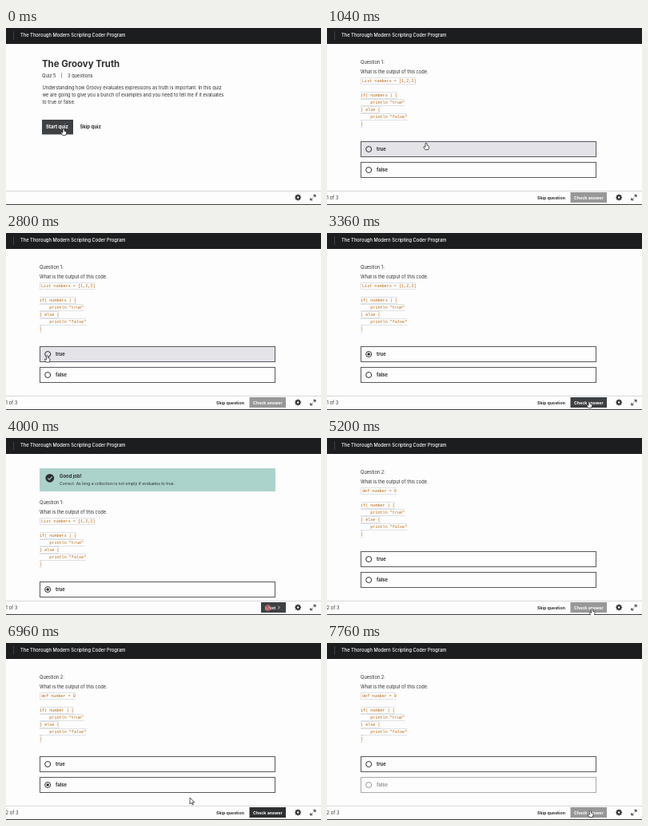
Write an HTML page that moves like this. It is 394 by 222 pixels and loops after 8000 ms.

```html
<!DOCTYPE html>
<html lang="en">
<head>
<meta charset="utf-8">
<title>Quiz</title>
<style>
  html, body { margin: 0; width: 100%; height: 100%; overflow: hidden; background: #fdfdfd; }
  svg { display: block; width: 394px; height: 222px; }
  text { font: 5.74px Inter, sans-serif; fill: #2d2f31; white-space: pre; }
  .b { font-weight: 700; font-size: 5.9px; }
  .s { font-weight: 700; font-size: 5.25px; }
  .w { fill: #fff; }
  .code { font: 5.12px "Liberation Mono", monospace; fill: #b4690e; }
  .chip { fill: none; stroke: #dfe1e4; }
  .line { fill: none; stroke: #2d2f31; }
</style>
</head>
<body>
<svg id="stage" viewBox="0 0 394 222"></svg>
<script>
const LOOP = 8000, STEP = 80;
const INK = '#2d2f31', EDGE = '#58595b', HOVER = '#e3e3e8';
const OPTIONS = [['true', 142], ['false', 168]];

// Pointer path: time, x, y, shape
const path = [
  [0, 72, 126, 'hand'], [80, 98, 125, 'hand'], [160, 122, 125.5, 'arrow'],
  [720, 122, 125.5, 'arrow'], [1040, 124, 144, 'hand'], [1360, 127, 151, 'hand'],
  [1520, 127, 151, 'hand'], [1600, 127.5, 152, 'hand'], [1680, 127.5, 152, 'hand'],
  [1760, 80, 174, 'hand'], [1840, 33, 140, ''], [2560, 33, 140, 'arrow'],
  [2720, 47, 151, 'hand'], [2800, 51.5, 153.5, 'hand'], [3120, 51.5, 153.5, 'hand'],
  [3200, 130, 171, 'hand'], [3280, 260, 198, 'arrow'], [3360, 328, 211, 'hand'],
  [3760, 328, 211, 'hand'], [3840, 327.5, 209.5, 'stop'], [4800, 327.5, 209.5, 'stop'],
  [4880, 329, 211, 'hand'], [5040, 331.5, 214, 'hand'], [6000, 331.5, 214, 'hand'],
  [6080, 310, 207, 'arrow'], [6160, 220, 190, 'arrow'], [6240, 100, 179, 'hand'],
  [6320, 63, 177, 'hand'], [6400, 62, 176.5, 'hand'], [6800, 62, 176.5, 'hand'],
  [6880, 110, 179, 'hand'], [6960, 230, 194, 'arrow'], [7040, 312, 203, 'arrow'],
  [7120, 312, 203, 'arrow'], [7200, 324, 211, 'hand'], [7280, 329.5, 210, 'hand'],
  [LOOP, 329.5, 210, 'hand']
];

// Page state: time, changed values
const states = [
  [0, { page: 0, pick: '', checked: false, good: false }],
  [400, { page: 1 }],
  [3040, { pick: 'true' }],
  [3760, { checked: true }],
  [3840, { good: true }],
  [5200, { page: 2, pick: '', checked: false, good: false }],
  [6720, { pick: 'false' }],
  [7760, { pick: '', checked: true }]
];

const text = (x, y, str, cls = '', style = '') =>
  `<text x="${x}" y="${y}" class="${cls}" style="${style}">${str}</text>`;
const rect = (x, y, w, h, fill, more = '') =>
  `<rect x="${x}" y="${y}" width="${w}" height="${h}" fill="${fill}" ${more}/>`;
const group = (id, body) => `<g id="${id}">${body}</g>`;

function snippet(lines) {
  return lines.map((str, i) => {
    if (!str) return '';
    const x = i ? 42 : 44, y = 68.4 + i * 8.95;
    const end = x + str.length * 3.07;
    const top = Math.round(y - 6) + .5, low = top + 8;
    const side = i ? '' : `M42.5 ${top}V${low}`;
    return `<path class="chip" d="M42 ${top}H${end}M42 ${low}H${end}${side}"/>` + text(x, y, str, 'code');
  }).join('');
}

function question(n, first, test) {
  return text(42, 44.7, `Question ${n}:`) + text(42, 56.5, 'What is the output of this code.') +
    snippet([first, '', `if( ${test} ) {`, '    println "true"', '} else {', '    println "false"', '}']);
}

const option = ([name, y]) => group('opt-' + name,
  rect(42.5, y + .5, 294, 19, 'none', `id="box-${name}" stroke="${EDGE}"`) +
  `<circle class="line" cx="52.2" cy="${y + 10}" r="3.5"/>` +
  `<circle id="dot-${name}" cx="52.2" cy="${y + 10}" r="1.8" fill="${INK}"/>` +
  text(62, y + 11.9, name, 'b'));

const intro =
  text(45, 49.4, 'The Groovy Truth', 'b', 'font-size:11.4px') +
  text(45, 62.3, 'Quiz 5') + text(68.5, 62.3, '|') + text(77, 62.3, '3 questions') +
  text(45.5, 77.3, 'Understanding how Groovy evaluates expressions as truth is important. In this quiz') +
  text(45.5, 86, 'we are going to give you a bunch of examples and you need to tell me if it evaluates') +
  text(45.5, 94.7, 'to true or false.') +
  rect(45, 115, 39, 18.5, INK, 'id="start"') +
  text(50, 126.3, 'Start quiz', 'b w') + text(92.5, 126.3, 'Skip quiz', 'b');

const feedback =
  rect(42, 38, 295, 29, '#acd2cc') + `<circle cx="54.8" cy="50.3" r="5.4" fill="${INK}"/>` +
  '<path d="M52.2 50.4l1.9 1.9 3.5-3.7" fill="none" stroke="#acd2cc" stroke-width="1.1"/>' +
  text(67, 49.9, 'Good job!', 'b') +
  text(67, 58.6, 'Correct. As long a collection is not empty if evaluates to true.', '', 'font-size:5px');

const footer =
  rect(0, 204, 394, 18, '#fdfdfd') + rect(0, 204, 394, 1, '#d5d8dc') + rect(0, 221, 394, 1, '#3c3e40') +
  group('progress',
    '<text id="count" x="-.4" y="215"></text>' +
    group('check', text(263, 214.7, 'Skip question', 's') + rect(304.5, 206, 45.5, 13, INK, 'id="check-box"') +
      text(309, 214.7, 'Check answer', 's w')) +
    group('next', rect(319, 206, 31, 13, '#3e4143') + text(325, 214.7, 'Next', 's w') +
      '<path d="M340.3 210.8l1.8 1.8-1.8 1.8" fill="none" stroke="#fff" stroke-width=".8"/>')) +
  '<circle class="line" cx="365.2" cy="212.5" r="2.2" stroke-width="1.9"/>' +
  '<circle class="line" cx="365.2" cy="212.5" r="3.3" stroke-width="1.3" pathLength="16" stroke-dasharray="1 1" stroke-dashoffset=".5"/>' +
  '<path class="line" d="M384.4 209.6h2.6v2.6M387 209.6l-2.5 2.5M383.4 215.8h-2.6v-2.6M380.8 215.8l2.5-2.5"/>';

const pointer =
  '<path id="hand" d="M-1 .8Q0-.6 1 .8V3.2L3 3.8Q3.8 4.2 3.6 5.4L2.8 8.6H-1.2L-3.2 5.6Q-3.2 4.4-2.2 4.6L-1 5.4Z" fill="#fff" stroke="#111" stroke-width=".7"/>' +
  '<path id="arrow" d="M0 0V8L1.9 6.3 3.1 9 4.4 8.4 3.2 5.8H5.6Z" fill="#fff" stroke="#111" stroke-width=".7"/>' +
  '<g id="stop" fill="none"><circle cy="3.5" r="2.6" stroke="#fff" stroke-width="1.9"/>' +
  '<path d="M-1.8 1.7l3.6 3.6M2.6 3.5a2.6 2.6 0 1 1-5.2 0a2.6 2.6 0 1 1 5.2 0" stroke="#b8323c" stroke-width="1.1"/></g>';

document.getElementById('stage').innerHTML =
  rect(0, 0, 394, 222, '#fdfdfd') +
  group('intro', intro) +
  group('feedback', feedback) +
  group('quiz',
    group('q1', question(1, 'List numbers = [1,2,3]', 'numbers')) +
    group('q2', question(2, 'def number = 0', 'number')) +
    OPTIONS.map(option).join('')) +
  footer +
  rect(0, 0, 394, 20, '#1c1d1f') + rect(9, 4, 1, 11, '#3e4143') +
  text(18, 11, 'The Thorough Modern Scripting Coder Program', 'w', 'font-size:5.75px;font-weight:500') +
  group('pointer', pointer);

const el = {};
document.querySelectorAll('[id]').forEach(node => el[node.id] = node);
const show = (id, on) => el[id].style.display = on ? '' : 'none';
const fill = (id, color) => el[id].setAttribute('fill', color);

function pointerAt(t) {
  const i = path.findIndex(key => key[0] > t) - 1;
  const [t0, x0, y0, shape] = path[i], [t1, x1, y1] = path[i + 1];
  const k = (t - t0) / (t1 - t0);
  return { x: x0 + (x1 - x0) * k, y: y0 + (y1 - y0) * k, shape };
}

function draw(now) {
  const t = Math.floor(now % LOOP / STEP) * STEP;
  const s = Object.assign({}, ...states.filter(row => row[0] <= t).map(row => row[1]));
  const p = pointerAt(t);
  const over = (x, y, w, h) => p.shape && p.x >= x && p.x < x + w && p.y >= y && p.y < y + h;

  show('intro', s.page === 0);
  show('quiz', s.page > 0);
  show('progress', s.page > 0);
  show('q1', s.page === 1);
  show('q2', s.page === 2);
  show('feedback', s.good);
  show('check', !s.good);
  show('next', s.good);
  el.count.textContent = s.page + ' of 3';
  el.quiz.setAttribute('transform', `translate(0 ${s.good ? 38 : 0})`);

  fill('start', over(45, 115, 39, 19) ? '#3e4143' : INK);
  for (const [name, y] of OPTIONS) {
    fill('box-' + name, !s.checked && over(42, y, 295, 20) ? HOVER : 'none');
    show('dot-' + name, s.pick === name);
  }
  el['opt-false'].style.opacity = s.page === 2 && s.checked ? .5 : 1;
  const ready = s.pick && !s.checked;
  fill('check-box', !ready ? '#989899' : over(304, 206, 46, 13) ? '#3e4143' : INK);

  el.pointer.setAttribute('transform', `translate(${p.x} ${p.y})`);
  for (const shape of ['hand', 'arrow', 'stop']) show(shape, p.shape === shape);
}

function tick() {
  draw(performance.now());
  requestAnimationFrame(tick);
}
tick();
</script>
</body>
</html>
```
